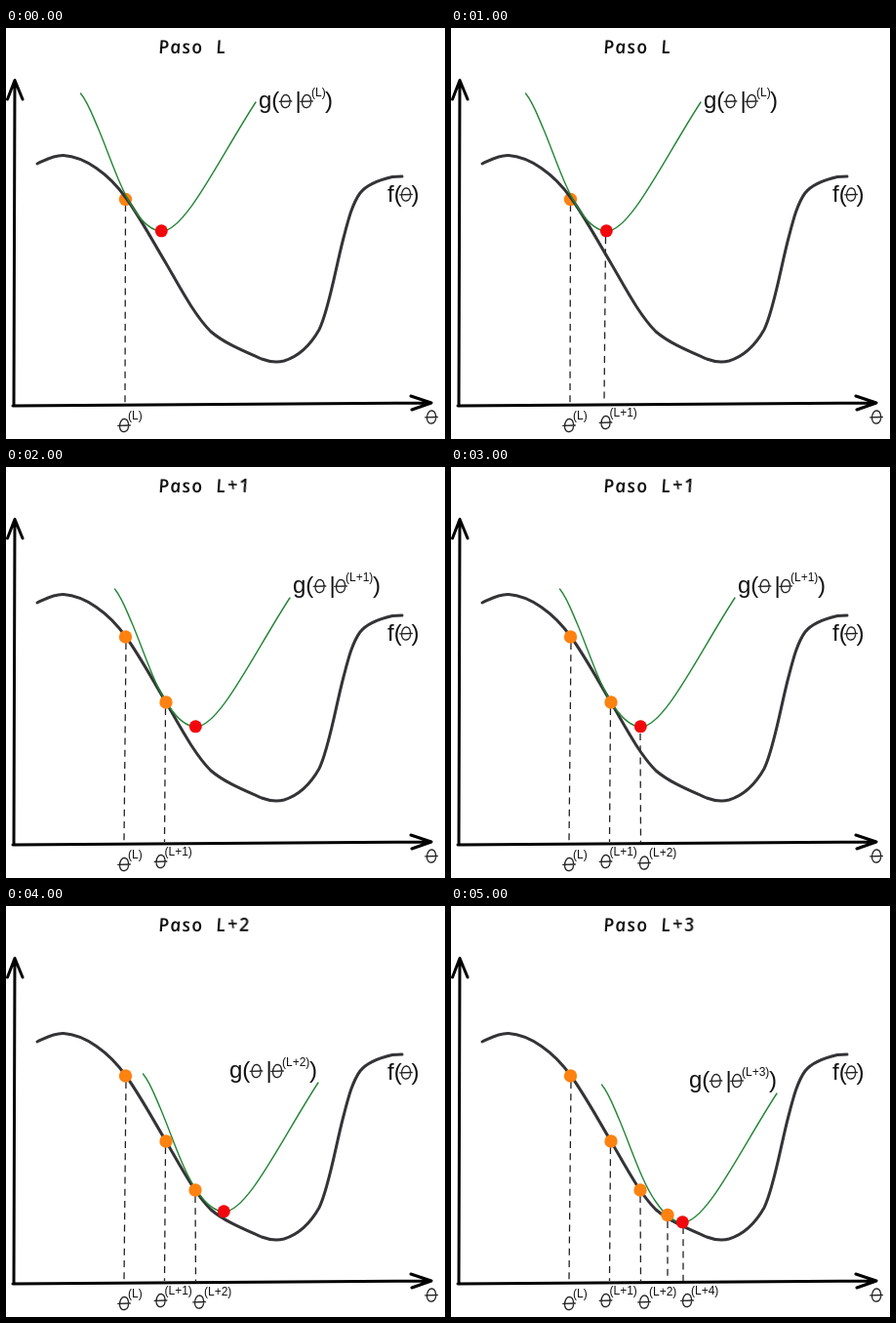
An HTML page that plays this animation: 450x421 px, repeating every 6 s.

```html
<!DOCTYPE html>
<html lang="es">
<head>
<meta charset="utf-8">
<title>Paso L</title>
<style>
html, body { margin: 0; width: 100%; height: 100%; overflow: hidden; background: #fff; }
svg { display: block; width: 100%; height: 100%; }
path, line { fill: none; stroke-linecap: round; stroke-linejoin: round; }
text { font-family: "Liberation Sans", Arial, sans-serif; font-size: 24px; fill: #111; }
.sup { font-size: 12px; }
.title text { font: italic 600 19px "Open Sans", "Noto Sans", sans-serif; letter-spacing: 1.2px; }
.axis { stroke: #000; stroke-width: 3; }
.curve { stroke: #343437; stroke-width: 3; }
.bound { stroke: #238636; stroke-width: 1.4; }
.drop { stroke: #222; stroke-width: 1.3; stroke-dasharray: 7 5.2; stroke-linecap: butt; }
.theta { stroke: #222; stroke-width: 1.3; }
.dot { fill: #fd8210; }
.next { fill: #f2080c; }

/* Hard cuts: one second per sixth of the loop */
[class^="step"], [class^="from"], .slide { animation: 6s step-end infinite; }
.step0 { animation-name: step0; }
.step1 { animation-name: step1; }
.step2 { animation-name: step2; }
.step3, .from5 { animation-name: from5; }
.from1 { animation-name: from1; }
.from2 { animation-name: from2; }
.from3 { animation-name: from3; }
.from4 { animation-name: from4; }
.slide { animation-name: slide; }
@keyframes step0 { 0% { opacity: 1 } 33.33%, to { opacity: 0 } }
@keyframes step1 { 0%, 66.66%, to { opacity: 0 } 33.33% { opacity: 1 } }
@keyframes step2 { 0%, 83.33%, to { opacity: 0 } 66.66% { opacity: 1 } }
@keyframes from1 { 0% { opacity: 0 } 16.66%, to { opacity: 1 } }
@keyframes from2 { 0% { opacity: 0 } 33.33%, to { opacity: 1 } }
@keyframes from3 { 0% { opacity: 0 } 50%, to { opacity: 1 } }
@keyframes from4 { 0% { opacity: 0 } 66.66%, to { opacity: 1 } }
@keyframes from5 { 0% { opacity: 0 } 83.33%, to { opacity: 1 } }
@keyframes slide {
  0% { transform: translate(0, 0) }
  33.33% { transform: translate(35px, 58px) }
  66.66% { transform: translate(64px, 105px) }
  83.33%, to { transform: translate(78px, 116px) }
}
</style>
</head>
<body>
<svg viewBox="0 0 450 421">
  <defs>
    <path id="theta" class="theta" d="M1 -6.5C-2.5 -7 -4.5 -3 -4.5 1C-4.5 5 -2 7 .5 6.5C4 6 5 2 4.5 -1.5C4 -5 2.5 -6.5 0 -6.3M-6.3 .3L6.3 0"/>
    <g id="bound-label">
      <text>g(</text>
      <use href="#theta" x="27.5" y="-7"/>
      <text x="37.5">|</text>
      <use href="#theta" x="49" y="-7"/>
    </g>
  </defs>

  <!-- The skew sets the round italic letters upright -->
  <g class="title" transform="translate(157 26) skewX(8)">
    <text>Paso</text>
    <text x="59">L</text>
    <text class="step1" x="71">+1</text>
    <text class="step2" x="71">+2</text>
    <text class="step3" x="71">+3</text>
  </g>

  <path class="axis" d="M8 387L9 54M1.5 73L9 53.5L17 73M7 387L435 384M415 377L436 384L416 391"/>
  <use href="#theta" x="436" y="398.5"/>

  <g class="step0">
    <line class="drop" x1="122.5" y1="181" x2="122" y2="384"/>
    <circle class="dot" cx="122.5" cy="175.5" r="6.7"/>
    <g class="from1"><line class="drop" x1="158.5" y1="214" x2="157" y2="384"/></g>
  </g>
  <g class="from2">
    <line class="drop" x1="123" y1="180" x2="121" y2="384"/>
    <line class="drop" x1="163.5" y1="247" x2="162.5" y2="384"/>
  </g>
  <g class="step1"><g class="from3"><line class="drop" x1="194" y1="273" x2="194.5" y2="384"/></g></g>
  <g class="from4"><line class="drop" x1="194" y1="297" x2="194.5" y2="384"/></g>
  <g class="from5">
    <line class="drop" x1="222" y1="323" x2="222" y2="384"/>
    <line class="drop" x1="238" y1="329" x2="238" y2="384"/>
  </g>

  <path class="curve" d="M32 139C41 135 49 130 59 130.5C81 132 105 149 123 174C138 195 152 221 164 241C178 265 193 294 210 311C224 323 244 331 262 339C270 342 277 343 285 341C301 336 312 325 321 309C331 289 338 245 346 215C351 196 355 180 363 169C371 159 385 155 396 152.5L406 152"/>
  <g class="slide">
    <path class="bound" d="M76.5 67C84 76 88 88 95 104C106 130 118 168 132 187C140 199 150 208 160 208C184 208 220 131 256 76"/>
  </g>

  <g class="from2">
    <circle class="dot" cx="122.5" cy="174" r="6.7"/>
    <circle class="dot" cx="164" cy="241" r="6.7"/>
  </g>
  <g class="from4"><circle class="dot" cx="194" cy="291" r="6.7"/></g>
  <g class="from5"><circle class="dot" cx="222" cy="316.5" r="6.7"/></g>
  <g class="slide"><circle class="next" cx="159.3" cy="207.8" r="6.5"/></g>

  <text x="391" y="178">f(</text>
  <use href="#theta" x="410" y="170.5"/>
  <text x="415.5" y="178">)</text>

  <g class="step0"><g transform="translate(259 82)">
    <use href="#bound-label"/><text class="sup" x="54" y="-12.5">(L)</text><text x="68" y="0">)</text>
  </g></g>
  <g class="step1"><g transform="translate(294 129)">
    <use href="#bound-label"/><text class="sup" x="54" y="-12.5">(L+1)</text><text x="82" y="0">)</text>
  </g></g>
  <g class="step2"><g transform="translate(229 176)">
    <use href="#bound-label"/><text class="sup" x="54" y="-12.5">(L+2)</text><text x="82" y="0">)</text>
  </g></g>
  <g class="step3"><g transform="translate(244 186)">
    <use href="#bound-label"/><text class="sup" x="54" y="-12.5">(L+3)</text><text x="82" y="0">)</text>
  </g></g>

  <use href="#theta" x="121" y="407"/>
  <text class="sup" x="125" y="401">(L)</text>
  <g class="from1"><use href="#theta" x="158.5" y="404"/><text class="sup" x="162.5" y="397.5">(L+1)</text></g>
  <g class="from3"><use href="#theta" x="198" y="405.5"/><text class="sup" x="203" y="399">(L+2)</text></g>
  <g class="from5"><use href="#theta" x="242" y="404"/><text class="sup" x="246" y="397.5">(L+4)</text></g>
</svg>
</body>
</html>
```
